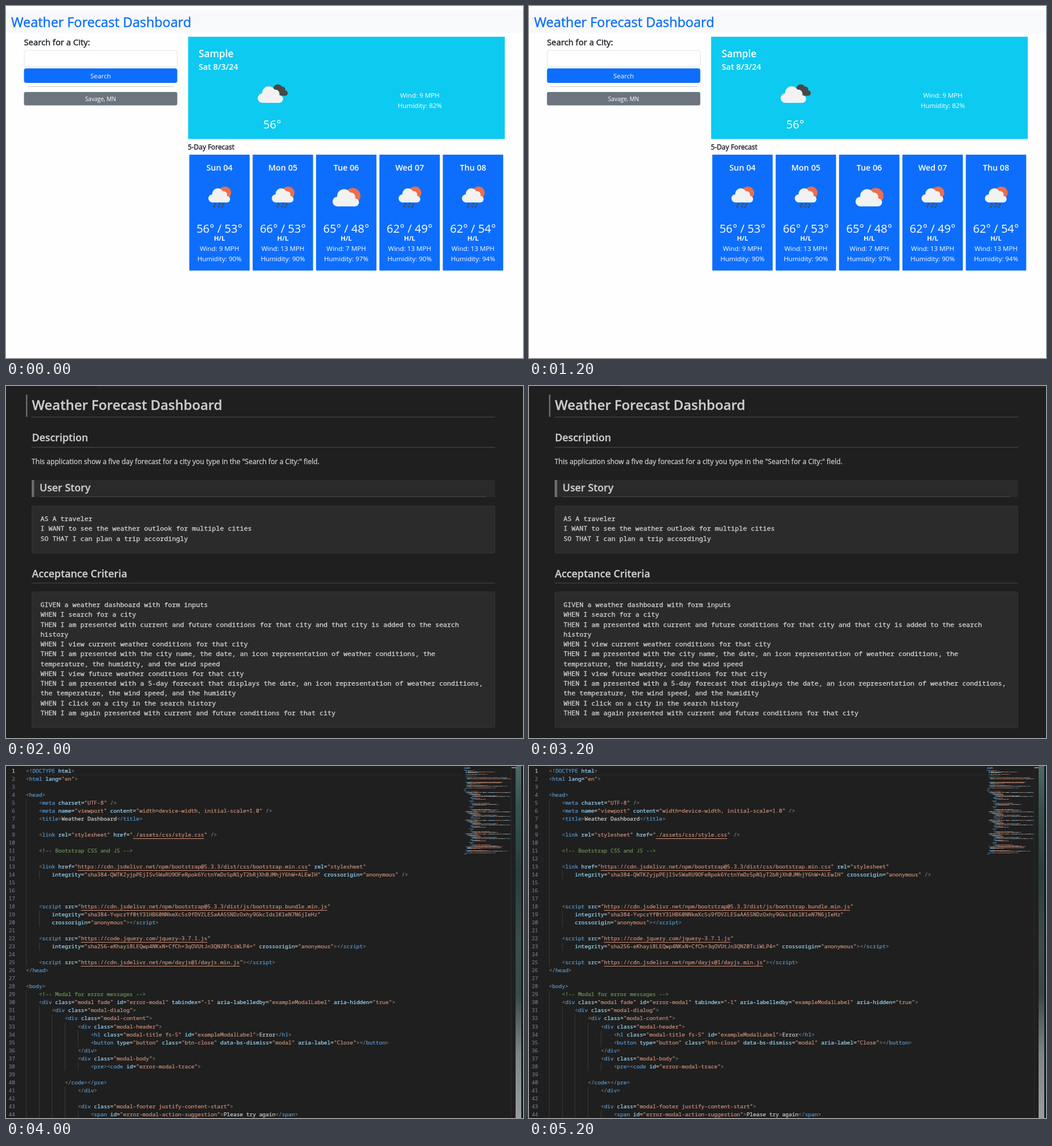
Write an HTML page that moves like this. It is 907x618 px and loops after 6000 ms.

```html
<!DOCTYPE html>
<html lang="en">
<head>
<meta charset="utf-8">
<title>Weather Dashboard</title>
<style>
  html, body { margin: 0; width: 100%; height: 100%; overflow: hidden; background: #fff }
  .scene { position: absolute; left: 0; top: 0; width: 907px; height: 618px; overflow: hidden; visibility: hidden }
  svg { font-family: "Open Sans", "Noto Sans", sans-serif }
  svg .mono, pre { font-family: "Noto Sans Mono", "DejaVu Sans Mono", monospace }
  .mono { white-space: pre }
  text { stroke-width: 0 }
  text.medium { stroke-width: .45px }
  #readme text { stroke-width: .3px }

  #editor { background: #1f1f1f }
  #editor > * { position: absolute }
  pre { margin: 0; font-size: 9.48px; line-height: 14.02px; color: #d4d4d4; -webkit-text-stroke: .2px }
  pre b { font-weight: 400 }
  pre i { display: inline-block; height: 14.02px; vertical-align: top; box-shadow: inset 1px 0 #383838 }
  .punct { color: #808080 }
  .tag { color: #569cd6 }
  .attr { color: #9cdcfe }
  .str { color: #ce9178 }
  .note { color: #6a9955 }
  .url { text-decoration: underline 1px; text-underline-offset: 3px }
  #numbers { left: 0; top: 2px; width: 16px; text-align: right; color: #6e7681 }
  #numbers::first-line { color: #ccc }
  #code { left: 35px; top: 2px }
  #current { left: 34px; top: 1px; width: 766px; height: 13px; border: solid #2a2a2a; border-width: 1px 0 }
  #map { left: 803px; top: 2px; width: 83px; height: 160px; overflow: hidden }
  #map pre { transform: scale(.128, .107); transform-origin: 0 0; -webkit-text-stroke: 1.2px }
  #map i { box-shadow: none }
  #map .url { text-decoration: none }
  #ruler { left: 886px; top: 0; width: 7px; height: 618px; border-left: 1px solid #2b2b2b }
  #cursor { left: 887px; top: 2px; width: 7px; height: 2px; background: #8a8a8a }
  #wall { left: 894px; top: 0; width: 10px; height: 618px; border-right: 3px solid #151a1b;
    background: linear-gradient(#4c6867, #385150 12%, #2a3d3e 30%, #3c4c4d 50%, #394849 65%, #7d8787 82%, #959e9e) }
</style>
</head>
<body>
<svg class="scene" id="dashboard"></svg>
<svg class="scene" id="readme"></svg>
<div class="scene" id="editor">
  <div id="current"></div>
  <pre id="numbers"></pre>
  <pre id="code"></pre>
  <div id="map"><pre></pre></div>
  <div id="ruler"></div>
  <div id="cursor"></div>
  <div id="wall"></div>
</div>
<script>
const $ = selector => document.querySelector(selector);
const rect = (x, y, w, h, fill, more = '') =>
  `<rect x="${x}" y="${y}" width="${w}" height="${h}" fill="${fill}" ${more}/>`;
const text = (x, y, size, str, color, more = '') =>
  `<text x="${x}" y="${y}" font-size="${size}" fill="${color}" stroke="${color}" ${more}>${str}</text>`;
const circle = (x, y, r, fill) => `<circle cx="${x}" cy="${y}" r="${r}" fill="${fill}"/>`;
const MEDIUM = 'class="medium"', SEMI = 'font-weight="600"', MID = 'text-anchor="middle"';

// Weather dashboard
const BLUE = '#0d6efd', INK = '#212529', WHITE = '#fff';

const cloud = (x, y, scale, fill) =>
  `<g transform="translate(${x} ${y}) scale(${scale})">` +
  circle(8.5, 21.5, 8.5, fill) + circle(20, 12, 12, fill) + circle(32, 13.5, 7.5, fill) +
  circle(39, 23, 7, fill) + rect(8.5, 13, 30.5, 17, fill) + '</g>';

const rainIcon = x => circle(x + 9.5, 328, 11, '#ec6e4c') + cloud(x - 19.5, 320, .83, '#f2f2f2') +
  [[-8, 347], [0, 346], [6, 348], [-10, 351], [-2, 351], [4, 352]]
    .map(([dx, y]) => `<path d="M${x + dx} ${y}l1.2 2" stroke="#484848" stroke-width="2" stroke-linecap="round"/>`).join('');
const sunIcon = x => circle(x + 11.5, 333, 13.5, '#ec6e4c') + cloud(x - 24, 321.5, 1.01, '#f2f2f2');

const days = [
  ['Sun 04', 56, 53, 9, 90, rainIcon],
  ['Mon 05', 66, 53, 13, 90, rainIcon],
  ['Tue 06', 65, 48, 7, 97, sunIcon],
  ['Wed 07', 62, 49, 13, 90, rainIcon],
  ['Thu 08', 62, 54, 13, 94, rainIcon],
];
const dayCard = ([name, high, low, wind, humidity, icon], i) => {
  const x = 374.5 + i * 111.2;
  const line = (y, size, str, more = '') => text(x, y, size, str, WHITE, MID + ' ' + more);
  return rect(x - 53, 261, 106, 203.5, BLUE, 'rx="1"') + icon(x) +
    line(289, 14.3, name, SEMI) +
    line(398, 20, `${high}° / ${low}°`) +
    line(411.5, 11.3, 'H/L', 'font-weight="700"') +
    line(429.5, 11.5, `Wind: ${wind} MPH`) +
    line(447.5, 11.5, `Humidity: ${humidity}%`);
};

$('#dashboard').innerHTML =
  rect(0, 0, 907, 618, WHITE) + rect(0, 7, 907, 604, '#fefefe') + rect(0, 7, 907, 40, '#f8f9fa') +
  text(9, 37, 23.3, 'Weather Forecast Dashboard', BLUE, MEDIUM) +
  text(31.5, 69, 14.8, 'Search for a City:', INK, MEDIUM) +
  rect(32, 78, 268.5, 28, WHITE, 'rx="4" stroke="#dee2e6"') +
  rect(31.5, 109.5, 269, 25.5, BLUE, 'rx="4"') + text(166, 126.5, 11.4, 'Search', WHITE, MID) +
  rect(38, 141, 257, 1, '#c8c9ca') +
  rect(31.5, 151, 269, 23.5, '#6c757d', 'rx="3"') + text(166, 166.5, 10, 'Savage, MN', WHITE, MID) +
  rect(319.5, 54, 555.5, 179.5, '#0dcaf0') +
  text(338, 90, 17.2, 'Sample', WHITE, SEMI) + text(338, 112, 14.3, 'Sat 8/3/24', WHITE, SEMI) +
  cloud(463.5, 137.5, .67, '#484848') + cloud(441.5, 141, .97, '#f2f2f2') +
  text(467, 215, 20, '56°', WHITE, MID) +
  text(726, 161, 11.5, 'Wind: 9 MPH', WHITE, MID) + text(726, 179, 11.5, 'Humidity: 82%', WHITE, MID) +
  text(319, 252, 11.9, '5-Day Forecast', INK, MEDIUM) +
  days.map(dayCard).join('');

// Readme preview
const GREY = '#cccccc';
const rule = (y, x = 45, right = 858) => rect(x, y, right - x, 1, '#4b4b4b');
const codeBox = (y, h, lines) => rect(45.5, y + .5, 812, h, '#2b2b2b', 'rx="2" stroke="#343434"') +
  lines.split('\n').map((line, i) => text(60.5, y + 27 + i * 17.27, 11.67, line, '#d4d4d4', 'class="mono"')).join('');

$('#readme').innerHTML =
  rect(0, 0, 907, 618, '#1f1f1f') + rect(163, 1, 744, 1, '#2e2e2e') + rect(162, 0, 1, 2, '#2e2e2e') +
  rect(35, 15, 2.5, 39, '#6b6b6b') +
  text(45.5, 41.5, 23.85, 'Weather Forecast Dashboard', GREY, SEMI) + rule(54) +
  text(45.5, 97, 17.8, 'Description', GREY, SEMI) + rule(107) +
  text(45, 137, 12.15, 'This application show a five day forecast for a city you type in the "Search for a City:" field.', GREY) +
  rect(45, 165, 813, 30, '#2a2a2a') + rect(45, 165, 4.5, 30, '#6b6b6b') +
  text(59, 184.5, 17.8, 'User Story', GREY, SEMI) + rule(194, 59, 843) +
  codeBox(210, 83, `AS A traveler
I WANT to see the weather outlook for multiple cities
SO THAT I can plan a trip accordingly`) +
  text(45.5, 335.5, 17.8, 'Acceptance Criteria', GREY, SEMI) + rule(345.5) +
  codeBox(361, 238.5, `GIVEN a weather dashboard with form inputs
WHEN I search for a city
THEN I am presented with current and future conditions for that city and that city is added to the search
history
WHEN I view current weather conditions for that city
THEN I am presented with the city name, the date, an icon representation of weather conditions, the
temperature, the humidity, and the wind speed
WHEN I view future weather conditions for that city
THEN I am presented with a 5-day forecast that displays the date, an icon representation of weather conditions,
the temperature, the wind speed, and the humidity
WHEN I click on a city in the search history
THEN I am again presented with current and future conditions for that city`);

// Code editor
const page = `<!DOCTYPE html>
<html lang="en">

<head>
    <meta charset="UTF-8" />
    <meta name="viewport" content="width=device-width, initial-scale=1.0" />
    <title>Weather Dashboard</title>

    <\link rel="stylesheet" href="./assets/css/style.css" />

    <\!-- Bootstrap CSS and JS -->

    <\link href="https://cdn.jsdelivr.net/npm/bootstrap@5.3.3/dist/css/bootstrap.min.css" rel="stylesheet"
        integrity="sha384-QWTKZyjpPEjISv5WaRU9OFeRpok6YctnYmDr5pNlyT2bRjXh0JMhjY6hW+ALEwIH" crossorigin="anonymous" />



    <\script src="https://cdn.jsdelivr.net/npm/bootstrap@5.3.3/dist/js/bootstrap.bundle.min.js"
        integrity="sha384-YvpcrYf0tY3lHB60NNkmXc5s9fDVZLESaAA55NDzOxhy9GkcIdslK1eN7N6jIeHz"
        crossorigin="anonymous"><\/script>

    <\script src="https://code.jquery.com/jquery-3.7.1.js"
        integrity="sha256-eKhayi8LEQwp4NKxN+CfCh+3qOVUtJn3QNZ0TciWLP4=" crossorigin="anonymous"><\/script>

    <\script src="https://cdn.jsdelivr.net/npm/dayjs@1/dayjs.min.js"><\/script>
</head>

<body>
    <\!-- Modal for error messages -->
    <div class="modal fade" id="error-modal" tabindex="-1" aria-labelledby="exampleModalLabel" aria-hidden="true">
        <div class="modal-dialog">
            <div class="modal-content">
                <div class="modal-header">
                    <h1 class="modal-title fs-5" id="exampleModalLabel">Error</h1>
                    <button type="button" class="btn-close" data-bs-dismiss="modal" aria-label="Close"></button>
                </div>
                <div class="modal-body">
                    <pre><code id="error-modal-trace">

            </code></pre>
                </div>

                <div class="modal-footer justify-content-start">
                    <span id="error-modal-action-suggestion">Please try again</span>`;

const span = (type, str) => `<b class="${type}">${str.replace(/</g, '&lt;').replace(/>/g, '&gt;')}</b>`;
const paintString = str => /^"(https:|\.)/.test(str)
  ? span('str', '"') + span('str url', str.slice(1, -1)) + span('str', '"')
  : span('str', str);
const paintTag = tag => tag.replace(/(<[\/!]?)(\w+)|("[^"]*")|([\w-]+)|\/?>/g, (all, open, name, str, attr) =>
  open ? span('punct', open) + span('tag', name)
    : str ? paintString(str)
    : span(attr ? 'attr' : 'punct', all));
const highlight = source => source
  .replace(/^(?=\n+( *))/gm, '$1') // blank lines carry the indent guides of the next line
  .replace(/<!--.*?-->|<[^>]*>/g, m => m.startsWith('<!--') ? span('note', m) : paintTag(m))
  .replace(/^ {4,}/gm, indent => indent.replace(/ {4}/g, '<i>    </i>'));

const lines = page.split('\n');
const modal = lines.slice(28);
// The minimap continues below the visible code with similar markup
const rest = [...modal.slice(9), ...modal.slice(0, 9), '', ...modal, ...modal, ...lines.slice(17, 26)];
$('#numbers').textContent = lines.map((_, i) => i + 1).join('\n');
$('#code').innerHTML = highlight(page);
$('#map pre').innerHTML = highlight([...lines, ...rest].join('\n'));

const scenes = document.querySelectorAll('.scene');
function tick() {
  const current = Math.floor(performance.now() % 6000 / 2000);
  scenes.forEach((scene, i) => scene.style.visibility = i === current ? 'visible' : 'hidden');
  requestAnimationFrame(tick);
}
tick();
</script>
</body>
</html>
```
